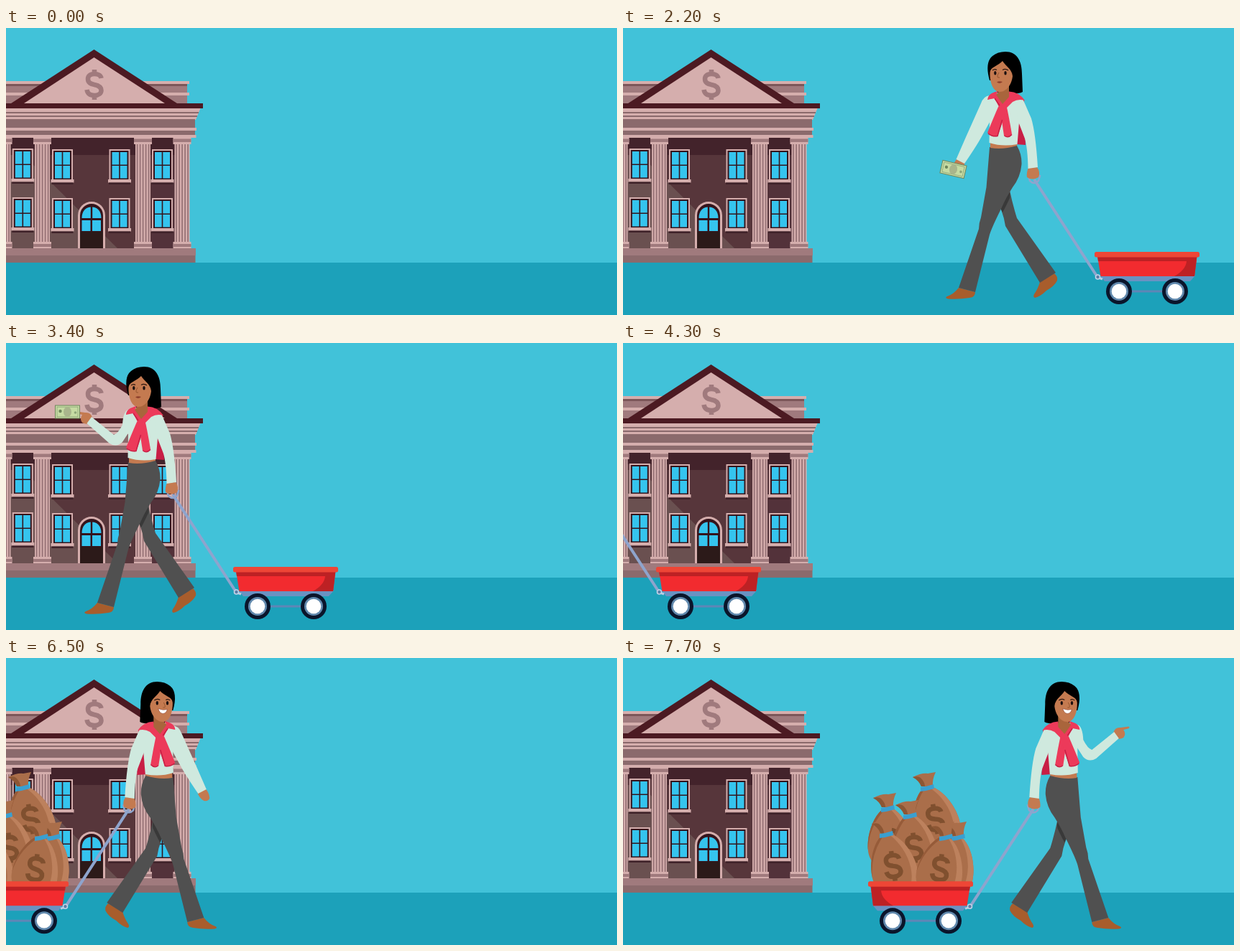
Write an HTML page that moves like this. It is 850 px wide and 400 px high and loops after 8 s.

```html
<!DOCTYPE html>
<html lang="en">
<head>
<meta charset="utf-8">
<title>Walk to the bank</title>
<style>
html, body { margin: 0; width: 100%; height: 100%; overflow: hidden; background: #41c2d9; }
svg { display: block; width: 850px; height: 400px; }
</style>
</head>
<body>
<svg id="stage" viewBox="0 0 850 400" xmlns="http://www.w3.org/2000/svg">
  <g id="bank"></g>
  <g id="actors"></g>
</svg>
<script>
const LIGHT = '#d5aead', MID = '#a07a7d', DULL = '#8b6a6c', MAROON = '#4c1a22';
const SKIN = '#c47a50', SHIRT = '#cfe9de', RED = '#ec3a5a', DEEP_RED = '#c81f45';
const PANTS = '#505050', PANTS_DARK = '#393939', SHOE = '#a85d2c', STEEL = '#8ea4cd';

const rect = (x, y, w, h, fill, extra = '') =>
  `<rect x="${x}" y="${y}" width="${w}" height="${h}" fill="${fill}" ${extra}/>`;
const path = (d, fill, extra = '') => `<path d="${d}" fill="${fill}" ${extra}/>`;
const line = (d, stroke, width, extra = '') =>
  path(d, 'none', `stroke="${stroke}" stroke-width="${width}" ${extra}`);
const circle = (x, y, r, fill, extra = '') => `<circle cx="${x}" cy="${y}" r="${r}" fill="${fill}" ${extra}/>`;
const group = (transform, content) => `<g transform="${transform}">${content}</g>`;

const dollar = color => line(
  'M9.5,-9C9,-13 5,-15 0,-15C-6,-15 -9,-12 -9,-8C-9,-2 -4,-1 0,0C5,1 9.5,3 9.5,8' +
  'C9.5,12 6,15 0,15C-6,15 -9.5,13 -10.5,7M0,-21V-15M0,15V21', color, 6.5);

// ---------- bank ----------
function windowAt(cx, y) {
  const panes = [-10.5, 0.8].map(dx => [4, 23].map(dy =>
    rect(cx + dx, y + dy, 9.7, 17.5, '#35c4ee')).join('')).join('');
  return rect(cx - 14.5, y, 29, 43, LIGHT) + rect(cx - 12.5, y + 2, 25, 40, '#35141c') + panes +
    rect(cx - 16, y + 42, 32, 4.5, LIGHT) + rect(cx - 15, y + 46.5, 30, 2.5, '#3f2229');
}

function columnAt(cx) {
  let flutes = '';
  for (let i = -2; i <= 2; i++) flutes += rect(cx + i * 4 - 0.7, 162, 1.6, 136, '#916d71');
  return rect(cx - 10.5, 162, 21, 136, LIGHT) + flutes +
    rect(cx - 12.5, 153, 25, 9, LIGHT) + rect(cx - 12.5, 154.5, 25, 4.5, MID) +
    rect(cx - 12.5, 298, 25, 9.5, LIGHT) + rect(cx - 12.5, 301, 25, 4, MID);
}

function door() {
  return path('M100,307V261A19,19 0 0 1 138,261V307Z', LIGHT) +
    path('M103,307V261A16,16 0 0 1 135,261V307Z', '#35141c') +
    path('M105.5,265C105.5,255 111,250 117.8,249.5V265ZM132.5,265C132.5,255 127,250 120.2,249.5V265Z', '#35c4ee') +
    rect(105.5, 268, 12, 15, '#35c4ee') + rect(120, 268, 12, 15, '#35c4ee') +
    rect(103, 284, 32, 23, '#2c1a19');
}

function bank() {
  return rect(0, 0, 850, 400, '#41c2d9') + rect(0, 327, 850, 73, '#1ca1ba') +
    // upper block and pediment
    rect(0, 74, 252, 31, MID) + rect(0, 74, 255, 4, LIGHT) + rect(0, 78, 252, 3, '#7c5659') +
    rect(0, 90, 255, 4, LIGHT) +
    path('M122.5,30L241,107H4Z', MAROON) + path('M122.5,41L221,105H25Z', LIGHT) +
    group('translate(123 79)', dollar(MID)) + rect(0, 105, 274, 7, MAROON) +
    // entablature
    path('M0,112H270.5L264,128H0Z', LIGHT) + rect(0, 117, 268, 2, DULL) + rect(0, 122, 266, 2, DULL) +
    rect(0, 127, 263, 26, DULL) + rect(0, 139, 265, 4, LIGHT) + rect(0, 149, 264.5, 4, LIGHT) +
    // walls
    rect(0, 153, 255, 154, '#57363b') + rect(202, 153, 33, 154, '#53323a') +
    path('M0,153L155,307H0Z', '#6a5050') + rect(0, 153, 255, 24, '#43232b') +
    path('M0,177H25L62,214V153H0Z', '#57363b') + rect(0, 153, 62, 16, '#43232b') +
    [-4, 50.5, 190.5, 245].map(columnAt).join('') +
    [169, 237].map(y => windowAt(23.3, y - 1) + [78.5, 158, 217.5].map(x => windowAt(x, y)).join('')).join('') +
    door() + rect(0, 307, 264, 10, MID) + rect(0, 317, 263.5, 10, DULL);
}

// ---------- wagon and bags ----------
const wheel = x => circle(x, 367, 18, '#0a152b') + circle(x, 367, 13, '#6189ad') + circle(x, 367, 10.3, '#fff');

const wagon = () =>
  line('M520,367H598', '#5f86b6', 3) +
  path('M494,345H626L619,353H500Z', '#6a92c2') +
  path('M490,318H628.5L625,346H494.5Z', '#f22b2f') +
  path('M490,318H628.5L625,346H597Q613,337 614,325H491Z', '#bd2124') +
  rect(486, 312, 146, 7.5, '#ee4636', 'rx="2.5"') +
  wheel(520) + wheel(598);

const handle = () =>
  line('M402,211L490,347', STEEL, 4) +
  line('M394,206Q402,201 410,206L408,213Q402,219 396,213Z', STEEL, 2.5) +
  line('M489,347L497,350', '#b9c9e2', 3) + circle(490.5, 347, 3, '#5a7fa8', 'stroke="#c5d3e8" stroke-width="1.6"');

const bag = ([x, y, tilt]) => group(`translate(${x} ${y})`,
  group(`rotate(${tilt})`,
    path('M-8,0C-22,10 -32,34 -32,54C-32,74 -18,82 0,82C18,82 32,74 32,54C32,34 22,10 8,0Z', '#aa6e4a') +
    path('M4,0H8C22,10 32,34 32,54C32,74 18,82 12,82C30,66 26,24 4,0Z', '#bd815d') +
    path('M-8,0C-22,10 -32,34 -32,54Q-28,22 -4,0Z', '#965b39') +
    group(`translate(0 44) rotate(${-tilt * 0.4})`, dollar('#80502f'))) +
  path('M-8,-3Q-11,-11 -20,-16Q-8,-22 1,-21L12,-23Q7,-13 8,-3Z', '#aa6e4a') +
  path('M-8,-3Q-11,-11 -20,-16Q-12,-18 -9,-15Q-3,-9 -3,-3Z', '#8c5634') +
  path('M-9,-2Q0,-3 9,-6L10,0Q0,3 -9,4Z', '#3a9fd0'));

const bags = () => [
  [223, 182, -15], [168, 211, -5], [199, 221, -8], [266, 251, 12], [166, 247, -13], [249, 251, 10]
].map(bag).join('');

// ---------- woman, facing left ----------
const shoeFront = path('M297,362L320,368Q320,375 312,376Q298,378.5 282,377.5Q277,376 281,374Q290,371 297,362Z', SHOE);
const shoeBack = path('M410,354L430,342Q435,346 434,352Q430,360 419,366Q411,374 403,376Q400,375 402,371Q407,364 410,354Z', SHOE);
const thighFront = 'M340,166L378,164Q385,176 384.5,190Q383,208 372,222Q362,238 357,250Q343,278 340,288';
const legFront = path(thighFront + 'L320,368L297,362L325,280Q325,272 328,264L335.5,222Z', PANTS);
const legBack = path('M355,225L367,222Q372,246 378,265L432,341L410,355L362,276Q360,262 354,248Z', PANTS);
const inseam = path('M367,222Q369,232 368,237Q362,250 358,257L354,249Q360,238 367,222Z', PANTS_DARK);

const legsWide = () => shoeBack + legBack + inseam + shoeFront + legFront;

// Opposite leg leading: the near leg trails on top.
const legsCrossed = () =>
  group('translate(18.5 3)', shoeFront) +
  path('M340,166L368,164L372,222L356,290L338,371L315,365L333,278L337,222Z', PANTS) +
  path('M350,228L372,222L362,262Q352,246 350,228Z', PANTS_DARK) +
  group('translate(-10 2)', shoeBack) +
  path('M340,166L378,164Q386,176 385,190Q384,212 378,228Q376,250 376,266L422,343L400,357L356,276Q353,252 345,225Z', PANTS);

const money = () =>
  rect(-17, -9, 34, 18, '#c6dba3', 'stroke="#6f875c" stroke-width="1"') +
  rect(-14.5, -6.8, 29, 13.6, 'none', 'stroke="#8da578" stroke-width=".8"') +
  '<ellipse rx="5.5" ry="7" fill="#a9b58c"/>' + circle(-10, -1, 2.2, '#6f875c') + circle(11, 1, 1.8, '#8da578');

const armDown = holds =>
  path('M295,182L306,187Q304,195 297,199Q290,200 289,195Q290,187 295,182Z', SKIN) +
  (holds ? group('translate(289.5 197) rotate(13)', money()) : '') +
  path('M342,94Q332,94 328,105L307,152L293.5,183L305,189Q322,164 328,153L344,124Z', SHIRT);

const armUp = holds =>
  path('M290,104Q288,96 280,97L269,95.5Q266,97 270,98.5L276,100Q272,106 276,111Q281,114 286,112Z', SKIN) +
  (holds ? group('translate(255.5 96)', money()) : '') +
  path('M340,93Q333,95 332,114Q326,126 320,128L289,103L282.5,112L314,140Q324,146 332,138L345,118Z', SHIRT);

const arms = {
  forward: armDown,
  low: holds => group('rotate(-14 343 100)', armDown(holds)),
  rising: holds => group('rotate(-45 342 102)', armUp(holds)),
  raised: armUp
};

const head = smile =>
  path('M340,73Q333,48 344,39Q351,33 362,33C378,33 385,46 385,64L386,89Q380,93 352,91L343,73Z', '#000') +
  path('M352,80L367,78V90L370,97L358,110L347,94L352,90Z', '#a9653c') +
  path('M358,46C352,53 341,54 340.5,62C340,76 345,89 354,89C364,89 371,78 372,67C371,57 363,54 358,46Z', SKIN) +
  line('M344,59Q347,56.5 350,58.5M358,58.5Q362,56 366,59', '#2c1610', 1.2) +
  '<ellipse cx="347.8" cy="62.8" rx="1.7" ry="2.8" fill="#1c1010"/><ellipse cx="362" cy="62.8" rx="1.7" ry="2.8" fill="#1c1010"/>' +
  line('M353,62Q350,67 351.5,69H354', '#95552f', 1) +
  (smile ? path('M348,71.5Q354,73.5 360.5,70.5Q359,77 354,77.5Q349,77 348,71.5Z', '#fff', 'stroke="#8d3f2c" stroke-width=".6"')
         : path('M350,75.5Q353,73.5 358,75Q354,78.5 350,75.5Z', '#8d3f2c'));

const scarf = () =>
  path('M337,100Q337,91 352,88L349,93L358,106L367,96L367,88.5Q381,89 389,101Q380,98 372,103L363,112H354L347,98Z', RED) +
  path('M354,106L363,106Q367,124 371,148Q366,154 360,150Q357,130 355,114Z', RED) +
  path('M356,106L364,110Q359,130 351,151Q343,152 337,146Q345,126 352,110Z', RED) +
  line('M338,147Q344,152 351,150.5L357.5,128M360.5,150Q366,154 371,148.5M347,98L354,108', DEEP_RED, 1.5);

const woman = (crossed, arm, holds, smile) =>
  path('M376,100L388,100L390,163L376,162Z', DEEP_RED) +
  (crossed ? legsCrossed() : legsWide()) +
  path('M341,157H378V164Q358,170 341,167Z', SKIN) +
  path('M340,96L352,90H372L384,97L381,132L378.5,162Q358,166 339.5,160L340,130Z', SHIRT) +
  path('M394,195L406,194Q411,201 408,208Q399,213 392,208Q391,201 394,195Z', SKIN) +
  path('M376,97Q385,94 388,103L398,126Q404,146 407,194L393.5,196Q393,168 389,154L379,128Z', SHIRT) +
  arms[arm](holds) + head(smile) + scarf();

// ---------- timeline ----------
const LOOP = 8000, STEP = 300, ARRIVE = 1000, GONE = 4900, RETURN = 5900;
const walkIn = [510, 420, 340, 250, 170, 80, 0, -90, -170, -260, -350, -440, -540];
const swing = step => step % 2 ? 'low' : 'forward';

function actorsAt(t) {
  if (t >= ARRIVE && t < GONE) {
    const step = Math.floor((t - ARRIVE) / STEP);
    const arm = { 7: 'rising', 8: 'raised' }[step] || swing(step);
    return group(`translate(${walkIn[step]} 0)`,
      wagon() + handle() + woman(step % 2, arm, true, false));
  }
  if (t >= RETURN) {
    const step = Math.floor((t - RETURN) / STEP);
    const dx = (step - 4) * 100;
    const mirror = (x, y) => `translate(${x + dx} ${y}) scale(-1 1)`;
    return group(`translate(${dx} 0)`, bags()) +
      group(mirror(773, -0.7), wagon() + handle()) +
      group(mirror(772.3, 0), woman(step % 2, step >= 4 ? 'raised' : swing(step), false, true));
  }
  return '';
}

const actors = document.getElementById('actors');
document.getElementById('bank').innerHTML = bank();
const start = performance.now();
let shown = null;

function render(now) {
  const t = Math.max(0, now - start) % LOOP;
  const markup = actorsAt(t);
  if (markup !== shown) actors.innerHTML = shown = markup;
  requestAnimationFrame(render);
}
render(start);
</script>
</body>
</html>
```
